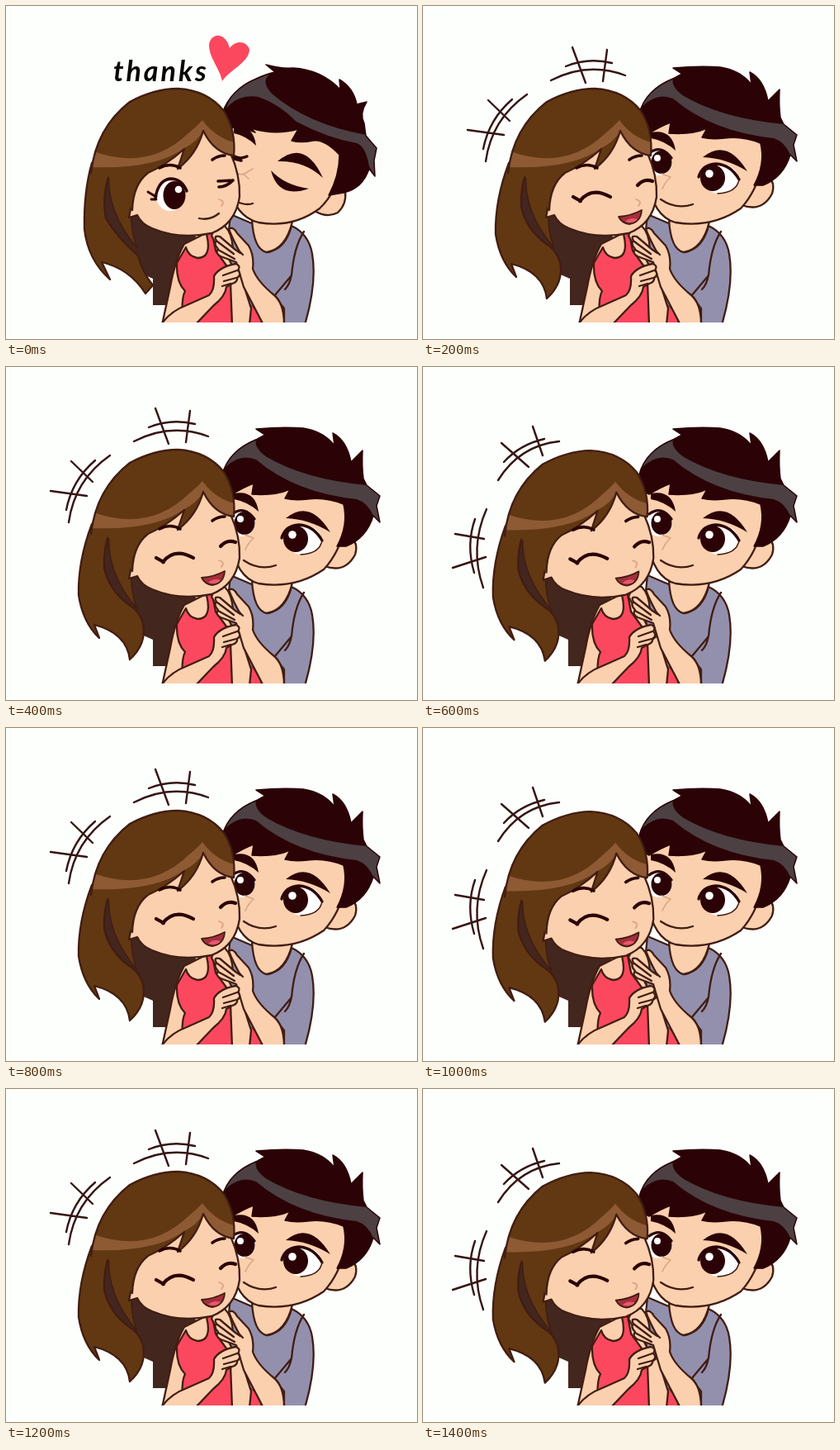
Recreate the animation shown at these times as an HTML page with a canvas. Size 498x403 px, loop 1600 ms.

```html
<!DOCTYPE html>
<html lang="en">
<head>
<meta charset="utf-8">
<title>Thanks</title>
<style>
html, body { margin: 0; width: 100%; height: 100%; overflow: hidden; background: #fdfffc; }
canvas { display: block; }
</style>
</head>
<body>
<canvas id="stage" width="498" height="403"></canvas>
<script>
const ctx = document.getElementById('stage').getContext('2d');
const STEP = 200;
const POSES = ['kiss', 'laugh', 'laugh', 'lean', 'laugh', 'lean', 'laugh', 'lean'];
const C = {
  paper: '#fdfffc', line: '#421d12', skin: '#fbd0ae', red: '#fc485e', shirt: '#9390ae',
  hair: '#623812', shine: '#8d5a34', back: '#43261e', black: '#2b0306', gloss: '#4c4043',
  nose: '#d9a583', mouth: '#a52f3d', tongue: '#e8596d'
};

function fill(d, color) {
  ctx.fillStyle = color;
  ctx.fill(new Path2D(d));
}
function line(d, width = 2.3, color = C.line) {
  ctx.lineWidth = width;
  ctx.strokeStyle = color;
  ctx.stroke(new Path2D(d));
}
function shape(d, color, width = 2.3) {
  fill(d, color);
  line(d, width);
}
function oval(x, y, rx, ry, color) {
  ctx.fillStyle = color;
  ctx.beginPath();
  ctx.ellipse(x, y, rx, ry, 0, 0, Math.PI * 2);
  ctx.fill();
}
function iris(x, y, rx, ry, dx, dy) {
  oval(x, y, rx, ry, C.black);
  oval(x + dx, y + dy, rx * .32, rx * .32, '#fff');
}

function manBody() {
  shape('M272 252 L300 264 Q302 296 317 298 Q339 294 346 266 Q367 276 371 300 Q377 335 362 386 L280 386 L268 290 Z', C.shirt);
  shape('M298 258 Q300 295 316 298 Q339 294 347 261 Z', C.skin);
  line('M361 273 Q349 291 346 326 L325 351 L337 366 L337 384 M346 325 Q344 337 338 343');
}

function manKiss() {
  shape('M374 248 Q389 257 402 250 Q413 240 411 224 L388 218 Z', C.skin);
  shape('M266 140 L270 215 Q277 255 306 262 Q348 269 380 245 Q402 224 410 185 L410 140 Z', C.skin);
  const hair = 'M262 130 Q272 101 303 88 Q316 82 326 80 L315 71 Q332 76 348 75 Q382 77 405 101 L404 89 Q421 99 425 119 L437 116 Q428 130 434 142 L436 157 L449 172 L446 187 L447 206 L440 197 Q432 221 409 226 L391 229 Q404 205 404 180 Q386 161 372 163 Q357 166 346 163 L354 149 Q326 157 297 148 L302 153 Q288 148 279 145 L267 152 Z';
  fill(hair, C.black);
  fill('M267 124 Q273 101 300 90 L320 82 Q308 91 322 106 Q365 143 436 156 L449 172 L446 187 L447 206 L440 194 Q436 170 425 166 Q390 160 352 140 Q330 118 306 110 Q282 106 267 124 Z', C.gloss);
  line(hair, 1.5, C.black);
  fill('M329 188 Q362 160 384 208 Q362 187 329 188 Z', C.black);
  fill('M276 146 Q300 144 303 169 Q291 157 276 154 Z', C.black);
  fill('M321 199 Q338 217 367 221 Q330 234 321 199 Z', C.black);
  line('M273 179 Q281 187 292 182 M273 184 L285 187', 3.4, C.black);
  line('M279 202 Q285 205 289 203 L299 197 M287 203 L294 209', 1.6, C.nose);
  line('M278 236 Q290 242 299 239');
}

function manSmile() {
  shape('M386 241 Q411 250 423 227 Q427 214 419 207 L400 208 Z', C.skin);
  shape('M266 140 L272 210 Q279 255 306 262 Q350 269 385 245 Q404 225 412 190 L414 140 Z', C.skin);
  const hair = 'M262 130 Q270 101 303 88 L314 82 L303 75 Q335 72 360 74 Q385 78 398 95 L396 80 Q413 89 418 115 L432 101 Q431 120 433 135 L437 143 L453 156 L449 168 L453 188 L445 180 Q437 207 412 217 L401 217 Q415 191 409 166 Q387 157 365 160 Q350 162 338 159 L344 148 Q326 156 298 154 L300 141 Q289 145 274 154 L266 150 Z';
  fill(hair, C.black);
  fill('M266 121 Q273 100 303 87 Q300 98 316 109 Q362 136 437 143 L453 156 L449 168 L453 188 L445 180 Q438 164 425 160 Q350 152 303 112 Q284 104 266 121 Z', C.gloss);
  line(hair, 1.5, C.black);
  fill('M339 183 Q368 159 393 200 Q367 184 339 183 Z', C.black);
  fill('M276 153 Q302 148 306 175 Q293 163 276 160 Z', C.black);
  oval(286, 189, 16, 16, '#fff');
  iris(289, 189, 12.5, 14, -5, -5);
  line('M274 178 Q289 167 301 184', 3.3, C.black);
  oval(360, 209, 22, 18, '#fff');
  iris(351, 208, 15, 16, -4, -5);
  line('M334 207 Q338 192 355 191 Q373 192 383 210', 3.3, C.black);
  line('M383 210 Q380 226 357 227', 1.4);
  line('M289 203 L300 207 Q294 212 290 221', 1.6, C.nose);
  line('M288 234 Q307 247 327 240');
}

function girlBody() {
  shape('M216 288 Q205 307 199 340 L189 386 L280 386 L277 320 L252 270 Z', C.skin);
  shape('M218 292 L207 311 Q206 334 217 345 Q212 353 214 386 L278 386 L275 325 L254 296 L249 270 L243 276 Q250 305 232 305 Q221 303 218 292 Z', C.red);
}

function hands() {
  shape('M295 360 L309 375 L309 386 L292 386 Z', C.red, 1);
  shape('M272 334 L284 325 L297 366 L295 386 L274 386 Z', C.skin);
  shape('M249 278 Q254 263 265 266 Q274 275 275 294 L258 294 Z', C.skin);
  shape('M270 270 Q275 266 280 275 L294 290 Q301 302 299 318 Q304 333 325 350 Q337 360 337 386 L312 386 L288 340 L279 310 L260 303 Q253 299 257 294 Q251 288 255 284 Q251 277 259 279 L278 295 L284 299 Q275 283 270 270 Z', C.skin);
  line('M256 285 L276 300 M257 295 L277 306 M283 297 L287 301');
}

function forearm() {
  shape('M189 384 Q200 369 219 362 L246 350 Q253 344 252 327 Q258 316 278 312 Q285 314 281 320 Q286 325 280 329 Q281 334 274 336 L267 340 Q266 351 251 363 L229 386 L190 386 Z', C.skin);
  line('M263 326 L280 320 M264 333 L279 329 M262 339 L272 336');
}

function backHair() {
  fill('M118 195 L165 205 L213 250 L236 290 L215 310 L203 326 L194 362 L178 362 L178 330 L160 322 L130 290 L112 255 Z', C.back);
}

function tail(kiss) {
  const d = kiss
    ? 'M104 190 Q94 225 95 270 Q99 307 126 331 L116 310 Q150 318 169 348 L178 338 Q165 322 160 302 Q136 282 121 257 Q116 228 126 202 Z'
    : 'M104 190 Q87 235 88 276 Q93 309 113 328 L107 312 Q146 322 150 354 Q171 335 166 310 Q162 295 148 287 Q125 270 119 243 Q118 220 125 202 Z';
  shape(d, C.hair);
  shape('M125 202 Q121 248 159 293 Q149 270 153 235 L166 207 Z', C.hair, 1.5);
}

function girlHead(kiss) {
  tail(kiss);
  shape('M158 195 L153 235 L149 256 L159 253 Q164 264 177 269 Q210 283 249 275 Q278 264 283 231 Q284 205 272 178 L239 145 Z', C.skin);
  const cap = 'M103 202 Q109 148 150 116 Q180 100 208 100 Q244 102 264 127 Q279 151 276 181 Q252 178 239 151 Q231 180 208 197 L216 173 Q195 192 172 202 Q154 216 153 247 L123 205 Z';
  fill(cap, C.hair);
  fill('M109 177 Q174 199 221 154 Q233 144 238 138 Q252 158 276 165 L276 181 Q252 178 239 151 Q232 164 216 172 Q181 198 103 195 Z', C.shine);
  line('M153 247 Q154 216 172 202 Q195 192 216 173 L208 197 Q231 180 239 151 Q252 178 276 181 Q279 151 264 127 Q244 102 208 100 Q180 100 150 116 Q109 148 103 202');
  line('M186 196 Q199 189 211 196 M250 186 Q257 181 265 181', 3.6, C.black);
  line('M258 234 Q266 236 261 242', 1.8, C.nose);
  if (kiss) {
    oval(199, 230, 17, 18, '#fff');
    iris(204, 229, 13.5, 17, 5, -7);
    line('M181 233 Q184 211 199 209 Q213 209 219 224', 3.4, C.black);
    line('M172 225 L182 231 M176 234 L182 234', 2.8, C.black);
    line('M257 212 L275 211 M258 219 Q267 219 275 211', 3.6, C.black);
    line('M234 257 Q247 260 258 251');
  } else {
    line('M190 236 Q204 218 227 231 M182 231 L191 236', 4.2, C.black);
    line('M260 217 Q268 208 278 212', 4.2, C.black);
    shape('M237 255 Q252 254 265 247 Q264 262 250 264 Q241 263 237 255 Z', C.mouth, 1.8);
    fill('M245 261 Q251 255 260 258 Q255 264 245 261 Z', C.tongue);
  }
}

function marks(lean) {
  const d = lean
    ? 'M91 137 Q117 95 165 90 M98 115 Q117 94 147 87 M95 92 L128 121 M133 72 L145 107 M77 172 Q56 219 73 267 M63 184 Q52 215 62 249 M39 202 L74 208 M36 243 L76 230'
    : 'M155 90 Q200 67 245 84 M173 73 Q200 62 229 69 M181 50 L197 93 M223 53 L218 91 M126 107 Q83 137 76 188 M108 113 Q80 137 73 173 M79 114 L105 139 M54 150 L98 156';
  line(d, 2.4, '#351515');
}

function greeting() {
  fill('M262 91 C259 75 246 63 246 47 C248 32 266 31 271 51 C278 41 292 42 295 53 C294 69 271 77 262 91 Z', C.red);
  ctx.fillStyle = '#080505';
  ctx.font = 'italic bold 34px Lato, sans-serif';
  ctx.letterSpacing = '3px';
  ctx.fillText('thanks', 130, 91);
}

function draw(pose) {
  const kiss = pose === 'kiss', lean = pose === 'lean';
  const shift = lean ? -2 : 0;
  ctx.fillStyle = C.paper;
  ctx.fillRect(0, 0, 498, 403);
  ctx.lineJoin = ctx.lineCap = 'round';

  ctx.save();
  ctx.beginPath();
  ctx.rect(0, 0, 498, 383);
  ctx.clip();
  manBody();
  if (kiss) manKiss(); else manSmile();
  ctx.translate(shift, 0);
  backHair();
  girlBody();
  ctx.translate(-shift, 0);
  hands();
  ctx.translate(shift, 0);
  forearm();
  ctx.translate(-shift, 0);
  if (lean) {
    ctx.translate(207, 291);
    ctx.rotate(-.012);
    ctx.translate(-210, -290);
  }
  girlHead(kiss);
  ctx.restore();

  if (kiss) greeting(); else marks(lean);
}

function tick() {
  const t = performance.now() % (STEP * POSES.length);
  draw(POSES[Math.floor(t / STEP)]);
  requestAnimationFrame(tick);
}
tick();
</script>
</body>
</html>
```
